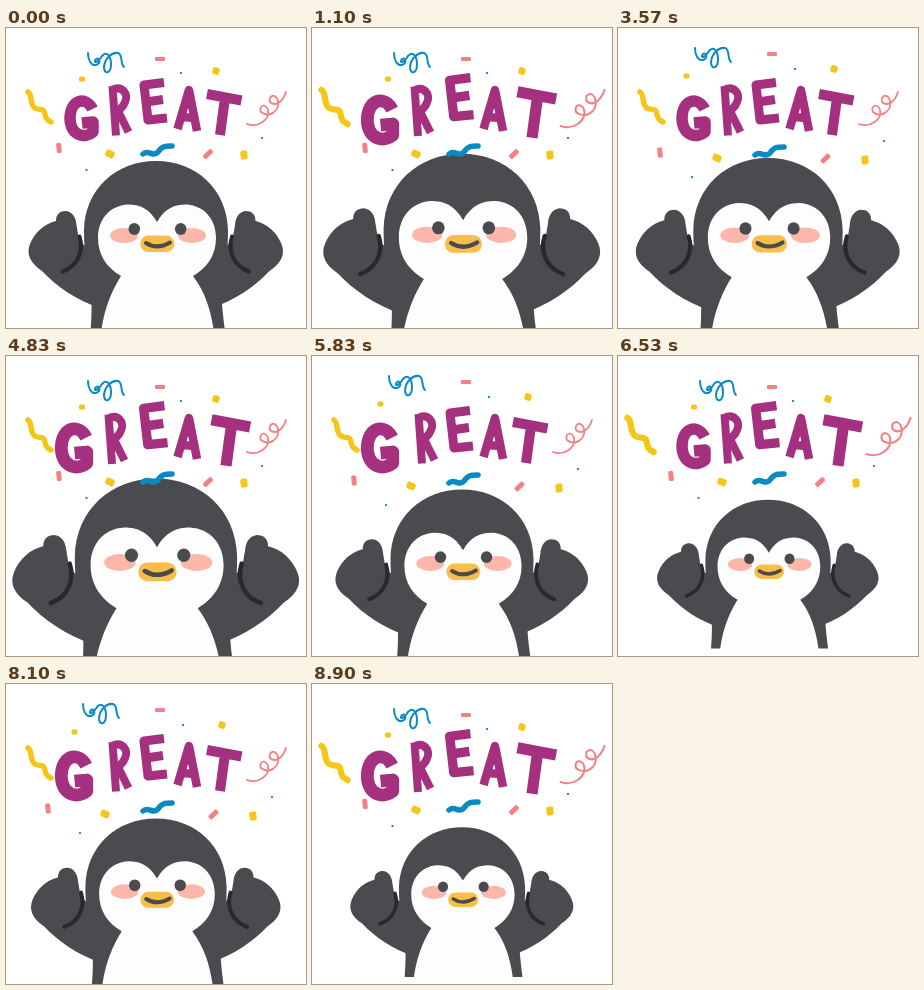
An HTML page with a canvas for the animation above (8.93 s loop, 300 px wide and 300 px high).

```html
<!DOCTYPE html>
<html lang="en">
<head>
<meta charset="utf-8">
<title>Great</title>
<style>
html, body { margin: 0; width: 100%; height: 100%; overflow: hidden; background: #fff; }
canvas { display: block; width: 300px; height: 300px; }
</style>
</head>
<body>
<canvas id="stage" width="300" height="300" role="img" aria-label="GREAT: a cheering penguin"></canvas>
<script>
const ctx = document.getElementById('stage').getContext('2d');
const LOOP = 8930, STEPS = 268, BEAT = 33.5;
const DARK = '#4a4b4e', INK = '#29292c', PURPLE = '#a5307f';
const BLUE = '#0a8ac3', YELLOW = '#f5c518', PINK = '#f67f83', BLUSH = '#fdb7aa';

// Penguin size over two beats: [step, scale]
const PULSE = [[0, 1], [6, 1.125], [11, 1.127], [17, 1.122], [30, 1.11],
  [40, 1.037], [41, 0.993], [50, 0.88], [65, 0.868], [66, 0.876], [67, 1]];

function pulse(step) {
  const i = PULSE.findIndex(p => p[0] > step);
  const [a, u] = PULSE[i - 1], [b, v] = PULSE[i];
  return u + (v - u) * (step - a) / (b - a);
}

const shape = d => new Path2D(d);

function line(path, color, width, cap = 'round') {
  ctx.strokeStyle = color;
  ctx.lineWidth = width;
  ctx.lineCap = cap;
  ctx.lineJoin = 'round';
  ctx.stroke(path);
}

function fill(path, color) {
  ctx.fillStyle = color;
  ctx.fill(path);
}

function oval(x, y, rx, ry, color) {
  ctx.beginPath();
  ctx.ellipse(x, y, rx, ry, 0, 0, Math.PI * 2);
  ctx.fillStyle = color;
  ctx.fill();
}

function pill(x, y, w, h, r, color) {
  ctx.beginPath();
  ctx.roundRect(x - w / 2, y - h / 2, w, h, r);
  ctx.fillStyle = color;
  ctx.fill();
}

// Draws around (x, y), scaled and moved to (x + dx, y + dy)
function posed(x, y, scale, dx, dy, draw) {
  ctx.save();
  ctx.translate(x + dx, y + dy);
  ctx.scale(scale, scale);
  ctx.translate(-x, -y);
  draw();
  ctx.restore();
}

const body = shape('M84.5 304 C86 285 86 270 84 252 C79 234 78 217 78 202 C79 161 110 133 150 133 C190 133 221 161 222 202 C222 217 221 234 217 252 C214 270 217 285 219 304 Z');
const arm = shape('M94 280 C70 272 50 258 36 243 C24 235 20 226 24 216 C29 204 38 196 50 193 C50 186 54 183 60 183 C67 184 70 190 70.5 197 L73 212 L96 235 Z');
const crease = shape('M73.5 208.5 C78 223 72 238 56.5 243.5');
const face = shape('M151 194 C143 180 133 176.5 122 176.5 C103 177.5 92 192 92 210 C92 227 101 240 115 248 C105 264 98 282 95 304.5 L208 304.5 C205 282 199 264 187 248 C201 240 210 227 210 210 C210 192 199 177.5 180 176.5 C169 176.5 159 180 151 194 Z');
const smile = shape('M140 215 Q151 222 164 214.5');

function drawArm() {
  fill(arm, DARK);
  line(crease, INK, 4);
}

function penguin(scale) {
  posed(150.3, 215, scale, 0, 0, () => {
    fill(body, DARK);
    drawArm();
    ctx.save();
    ctx.translate(299.5, 0);
    ctx.scale(-1, 1);
    drawArm();
    ctx.restore();
    fill(face, '#fdfdfd');
    oval(118, 207.5, 14, 7.5, BLUSH);
    oval(186, 207.5, 14, 7.5, BLUSH);
    oval(128.3, 201, 5.8, 6, DARK);
    oval(174.7, 201, 5.8, 6, DARK);
    pill(151.3, 215.8, 34, 16.5, 8, '#f8be48');
    line(smile, DARK, 4);
  });
}

const letters = {
  G: [shape('M86.5 81 C80 68 64 71 64 91 C65 108 79 111 87 104 L87 94 L76 95'), 11.5],
  R: [shape('M106.5 58 L110 107.5 M106 62 C116 57 123 66 119 74 C117 80 113 82 109 84 M111 81 L122.5 104'), 8],
  E: [shape('M158 54.5 L138 57 L142 92 L161 90 M140 74 L157 71.5'), 9],
  A: [shape('M171.5 101 L183 62 L191 103 M176 89 L189 90'), 8.5],
  T: [shape('M201 66 L235.5 72.5 M219 70 L214 107'), 10]
};

function letter(name, x, y, scale = 1, dx = 0, dy = 0) {
  const [path, width] = letters[name];
  posed(x, y, scale, dx, dy, () => line(path, PURPLE, width, 'butt'));
}

function word(popG, popT) {
  letter('G', 75.5, 89.5, ...(popG ? [1.11, -7.5, 1.5] : []));
  letter('R', 114, 83, ...(popG && popT ? [1, -4, 0.5] : []));
  letter('E', 147, 74, ...(popT ? [1.04, 0, -4] : []));
  letter('A', 182, 82);
  letter('T', 218, 85, ...(popT ? [1.12, 6.5, 0] : []));
}

const blueCurl = shape('M82 25 C82 32 85 38 90 37 C95 35 94 29 90 31 C87 35 91 36 96 28 C101 22 105 29 105 36 C105 46 98 47 98 39 C99 30 106 24 112 25 C117 26 114 36 118 39');
const pinkCurl = shape('M280 64 C277 74 269 79 264 74 C262 67 270 65 272 73 C274 84 262 90 255 84 C252 77 260 75 262 82 C264 92 252 100 241 96');
const yellowWave = shape('M22 64 C27 67 23 76 29 80 C34 83 38 79 39 86 C40 92 42 92 45 94');
const blueWave = shape('M137 126 C143 121 147 130 152 124 C156 118 159 118 166 118');

// Chips: colour, x, y, width, height, angle, moved x, moved y
const chips = [
  [PINK, 154, 31, 10, 4, 0, 154, 26],
  [PINK, 53, 120, 5, 10, -0.1, 42, 124.5],
  [PINK, 202, 126, 5, 11, 0.8, 207.5, 130.5],
  [YELLOW, 104, 126, 9, 7, 0.4, 99, 130],
  [YELLOW, 238, 127, 7, 9, -0.1, 247, 132],
  [YELLOW, 210, 43, 7, 7, 0.3, 216, 41],
  [YELLOW, 76, 51, 6, 5, 0, 68.5, 48],
  [BLUE, 175, 45, 2, 2, 0, 177, 41],
  [BLUE, 80.5, 142, 2, 2, 0, 74, 149],
  [BLUE, 256, 110, 2, 2, 0, 266, 113]
];

function confetti(moved, swung) {
  for (const [color, x, y, w, h, turn, mx, my] of chips) {
    ctx.save();
    ctx.translate(moved ? mx : x, moved ? my : y);
    ctx.rotate(turn);
    pill(0, 0, w, h, Math.min(w, h) * 0.3, color);
    ctx.restore();
  }
  posed(100, 34, 1, moved ? -5 : 0, moved ? -5 : 0, () => line(blueCurl, BLUE, 2));
  posed(152, 122, 1, 0, moved ? 1 : 0, () => line(blueWave, BLUE, 5.5));
  posed(33, 79, swung ? 1.14 : 1, swung ? -11 : 0, 0, () => line(yellowWave, YELLOW, 5.5));
  posed(260.5, 81, swung ? 1.13 : 1, swung ? 10 : 0, 0, () => line(pinkCurl, PINK, 1.8));
}

function draw(ms) {
  const step = Math.floor((ms % LOOP) * 0.03 + 0.15) % STEPS;
  const beat = step % BEAT;
  ctx.fillStyle = '#fff';
  ctx.fillRect(0, 0, 300, 300);
  penguin(pulse(step % (BEAT * 2)));
  word((beat > 7 && beat < 14) || beat >= 32, beat > 9);
  confetti(beat > 3 && beat < 9, beat > 14);
}

const start = performance.now();
function tick() {
  draw(performance.now() - start);
  requestAnimationFrame(tick);
}
tick();
</script>
</body>
</html>
```
